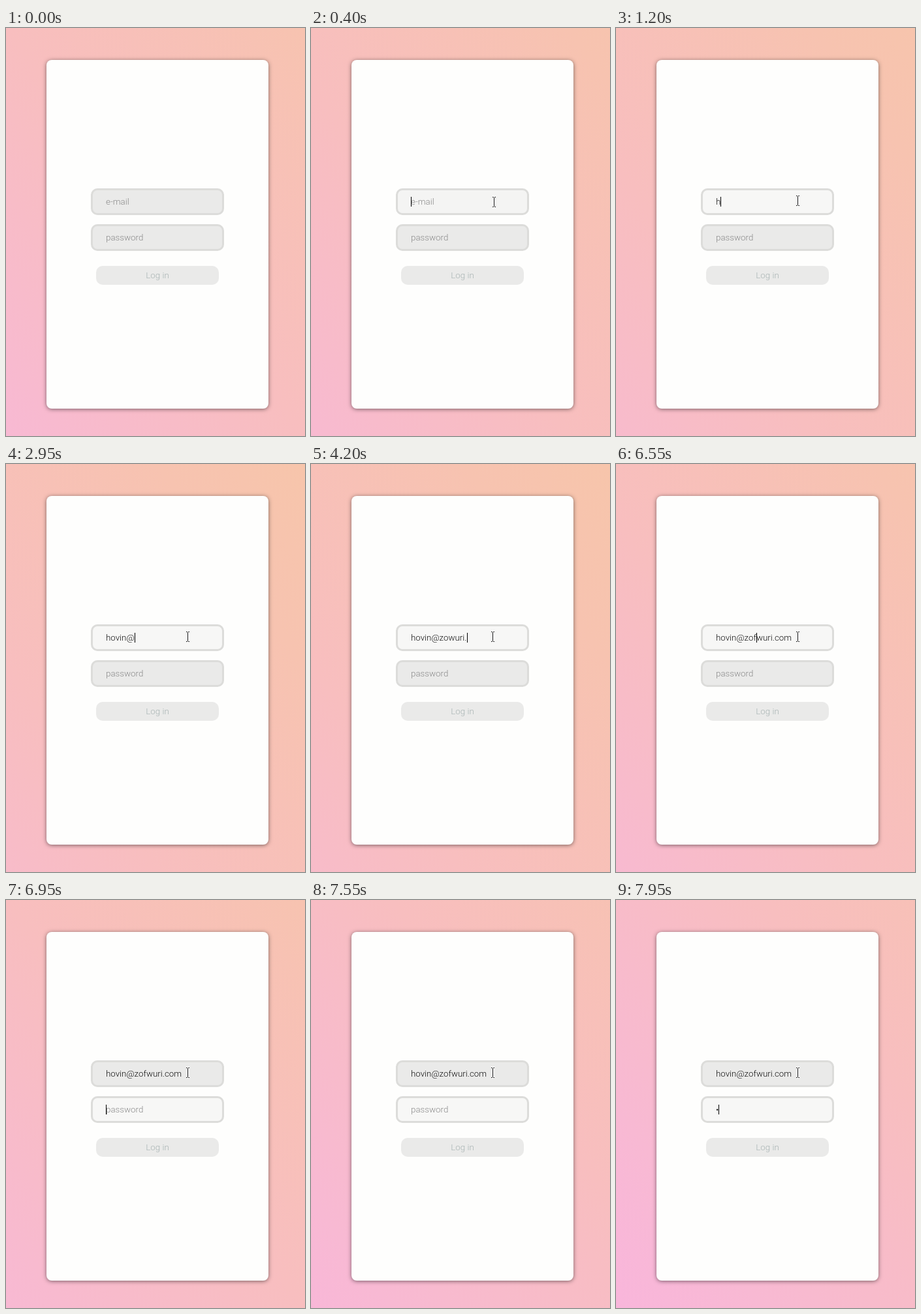
Recreate the animation shown at these times as an HTML page. Size 458 px wide and 626 px high, loop 8 s.

```html
<!DOCTYPE html>
<html lang="en">
<head>
<meta charset="utf-8">
<title>Login form</title>
<style>
  html, body { margin: 0; width: 100%; height: 100%; overflow: hidden; }
  body { position: relative; font: 300 13.333px/15px Roboto, sans-serif; }
  .card, .field, .button, svg { position: absolute; box-sizing: border-box; }
  .card {
    left: 62px; top: 49px; width: 340px; height: 535px;
    border-radius: 8px; background: #fefefd;
    box-shadow: 0 1px 6px rgba(0, 0, 0, .5);
  }
  .field {
    left: 130px; width: 204px; height: 41px; padding: 10px 20px;
    border: 3px solid #dcdcda; border-radius: 10px;
    color: #111; white-space: pre;
  }
  .empty { color: #8a8a8a; }
  .field i { position: absolute; width: 1px; height: 15px; background: #000; }
  .button {
    left: 138px; top: 365px; width: 188px; height: 29px; padding-top: 7px;
    border-radius: 10px; background: #eaeae9; color: #a9b4b4; text-align: center;
  }
  svg { left: 0; top: 0; width: 458px; height: 626px; overflow: visible; }
</style>
</head>
<body>
<div class="card"></div>
<div class="field" id="email" style="top:246px"></div>
<div class="field" id="pass" style="top:301px"></div>
<div class="button">Log in</div>
<svg viewBox="0 0 458 626" fill="none">
  <path id="wave" stroke="#e4572e" stroke-width="1"/>
  <g id="arrow">
    <path d="M0 0V16L4 12.5L6.5 18.5L9 17.5L6.5 11.5H11.5Z" fill="#fff" stroke="#000"/>
  </g>
  <g id="beam">
    <path id="halo" stroke="#fff" stroke-width="3"/>
    <path id="stem" stroke="#111" stroke-width="1"/>
  </g>
</svg>
<script>
const LOOP = 8000, FOCUS = 250, TAB = 6700, FIX = 6450, DOT = 7850;
const $ = id => document.getElementById(id);
const clamp = v => Math.max(0, Math.min(1, v));
const ramp = (t, from, to) => clamp((t - from) / (to - from));

// "<" steps the caret left, anything else is typed
const keys = [
  [1200, 'h'], [1350, 'o'], [1400, 'v'], [1500, 'i'], [1550, 'n'],
  [2950, '@'], [3200, 'z'], [3350, 'o'], [3550, 'w'], [3600, 'u'],
  [3750, 'r'], [3950, 'i'], [4200, '.'], [4250, 'c'], [4450, 'o'], [4550, 'm'],
  [5050, '<<<'], [5450, '<'], [5950, '<'], [6050, '<'], [6150, '<'], [6250, '<'],
  [FIX, 'f']
];

const stops = [
  [-.3, '#f9b5dd'], [0, '#f8b9d3'], [.5, '#f8bebf'], [1, '#f7c3b0'], [1.25, '#f7c5ab']
];

const beam = 'M-2.5 -7.5H-1L0 -6.5L1 -7.5H2.5M0 -6.5V6.5M-2.5 7.5H-1L0 6.5L1 7.5H2.5';
$('halo').setAttribute('d', beam);
$('stem').setAttribute('d', beam);
$('wave').setAttribute('d', 'M153 275' + 'l2 -2l2 2'.repeat(28));

function typed(t) {
  let text = '', pos = 0, last = FOCUS;
  for (const [at, ops] of keys) {
    if (at > t) break;
    last = at;
    for (const c of ops) {
      if (c === '<') pos--;
      else {
        text = text.slice(0, pos) + c + text.slice(pos);
        pos++;
      }
    }
  }
  return { text, pos, last };
}

function drawField(el, text, hint, pos, caret, focus) {
  const shade = Math.round(234 + 13 * focus);
  const shown = text || hint;
  el.style.background = `rgb(${shade},${shade},${shade - 1})`;
  el.classList.toggle('empty', !text);
  el.replaceChildren(shown.slice(0, pos));
  if (caret) el.append(document.createElement('i'));
  el.append(shown.slice(pos));
}

function drawBackground(t) {
  const shift = .25 * (1 - Math.pow(Math.abs(t - 3475) / 3475, 2.7));
  const list = stops.map(([p, c]) => `${c} ${((p - shift) * 100).toFixed(2)}%`);
  document.body.style.background = `linear-gradient(to top right, ${list})`;
}

function drawPointer(t) {
  const k = 1 - Math.pow(1 - ramp(t, 50, 250), 2);
  const drift = 2 * (1 - ramp(t, 600, 850));
  const x = 429 + (277 + drift - 427.5) * k;
  const y = 209 + (265 + drift - 209) * k;
  const inside = x < 334 && y > 246;
  $('arrow').style.display = t >= 50 && !inside ? '' : 'none';
  $('beam').style.display = inside ? '' : 'none';
  $('arrow').setAttribute('transform', `translate(${x} ${y})`);
  $('beam').setAttribute('transform', `translate(${Math.round(x) - .5} ${Math.round(y)})`);
}

function draw(t) {
  const { text, pos, last } = typed(t);
  const blink = from => t >= from && (t - from) % 1000 < 500;
  const swap = ramp(t, TAB, TAB + 200);
  const secret = t >= DOT ? '•' : '';

  drawBackground(t);
  drawField($('email'), text, 'e-mail', pos, t < TAB && blink(last),
    ramp(t, FOCUS, FOCUS + 200) - swap);
  drawField($('pass'), secret, 'password', secret.length,
    blink(t >= DOT ? DOT : TAB), swap);
  $('wave').style.display = t >= 5200 && t < FIX ? '' : 'none';
  drawPointer(t);
}

const start = performance.now();
function tick() {
  const t = (performance.now() - start) % LOOP;
  draw(Math.floor(t / 50) * 50);
  requestAnimationFrame(tick);
}
tick();
</script>
</body>
</html>
```
